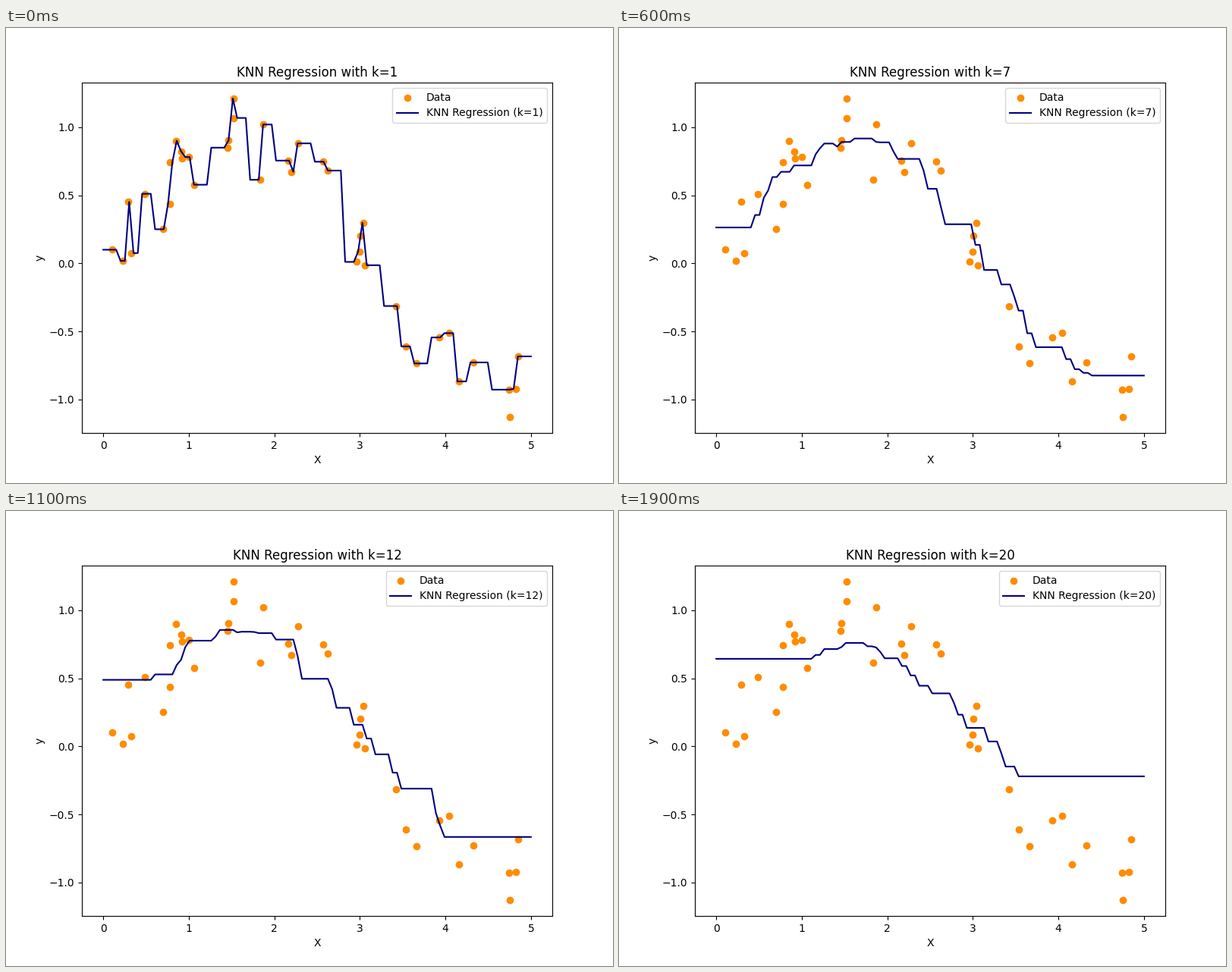
Recreate the animation shown at these times as a matplotlib script. Size 800 by 600 pixels, loop 2000 ms.

```python
import numpy as np
import matplotlib.pyplot as plt
from matplotlib.animation import FuncAnimation

MAX_K = 20
STEP_MS = 100

plt.rcParams["font.family"] = "DejaVu Sans"

# Noisy sine samples
np.random.seed(42)
x = np.sort(5 * np.random.rand(40))
y = np.sin(x) + 0.2 * np.random.randn(40)

# Training points ordered by distance from each grid position
grid = np.linspace(0, 5, 100)
order = np.argsort(np.abs(grid[:, None] - x), axis=1, kind="stable")


def predict(k):
    """Mean of the k nearest samples at every grid position."""
    return y[order[:, :k]].mean(axis=1)


fig, ax = plt.subplots(figsize=(8, 6), dpi=100)
ax.scatter(x, y, color="darkorange", label="Data")
line, = ax.plot(grid, predict(1), color="navy", label="KNN Regression (k=1)")
ax.set_xlabel("X")
ax.set_ylabel("y")
title = ax.set_title("KNN Regression with k=1")
legend = ax.legend(loc="upper right")
line_label = legend.get_texts()[1]


def update(frame):
    k = frame + 1
    line.set_ydata(predict(k))
    title.set_text(f"KNN Regression with k={k}")
    line_label.set_text(f"KNN Regression (k={k})")
    return line, title, legend


anim = FuncAnimation(fig, update, frames=MAX_K, interval=STEP_MS,
                     repeat=True, repeat_delay=0, blit=False)
plt.show()
```
